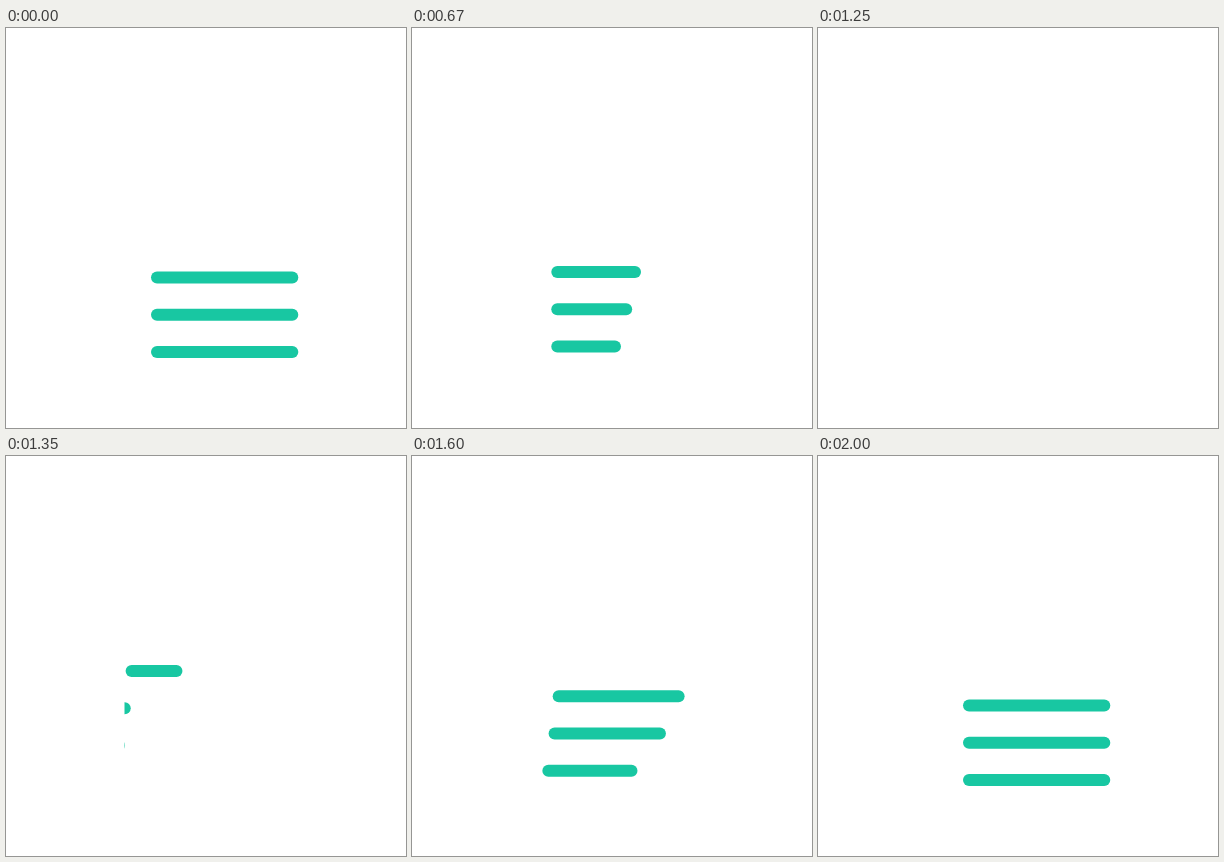
Recreate the animation shown at these times as an HTML page with a canvas. Size 400 by 400 pixels, loop 2.02 s.

```html
<!DOCTYPE html>
<html lang="en">
<head>
<meta charset="utf-8">
<title>Menu lines</title>
<style>
  html, body { margin: 0; width: 100%; height: 100%; overflow: hidden; background: #fff; }
  canvas { display: block; width: 400px; height: 400px; }
</style>
</head>
<body>
<canvas width="400" height="400"></canvas>
<script>
const ctx = document.querySelector('canvas').getContext('2d');
const LOOP = 2020, LEFT = 113, SHIFT = 38, LENGTH = 135.3, RISE = 37.3;
const bars = [
  { y: 249.5, start: 1167, time: 714 },
  { y: 286.8, start: 1291, time: 632 },
  { y: 324, start: 1347, time: 668 }
];

const clamp = v => Math.max(0, Math.min(1, v));

// cubic-bezier(.33, 0, .2, 1), solved by bisection
function ease(x) {
  if (x <= 0) return 0;
  if (x >= 1) return 1;
  let lo = 0, hi = 1;
  for (let i = 0; i < 24; i++) {
    const u = (lo + hi) / 2, v = 1 - u;
    if (3 * v * v * u * .33 + 3 * v * u * u * .2 + u ** 3 < x) lo = u;
    else hi = u;
  }
  return lo * lo * (3 - 2 * lo);
}

function line(x, y, length) {
  ctx.beginPath();
  ctx.moveTo(x, y);
  ctx.lineTo(x + Math.max(length, .01), y);
  ctx.stroke();
}

function leave(t) {
  const e = ease((t - 535) / 750);
  bars.forEach((bar, i) => {
    const left = 1 - clamp((t - 520) / (248 - 20 * i)) ** 1.7;
    if (left > 0) line(LEFT + SHIFT * (1 - e), bar.y - RISE * e, LENGTH * left);
  });
}

function enter(t) {
  const lift = RISE * (1 - ease((t - 1250) / 750));
  const edge = 130 - 11.5 * ((t - 1250) / 100) ** 2;
  ctx.save();
  ctx.beginPath();
  ctx.rect(Math.max(0, edge), 0, 400, 400);
  ctx.clip();
  for (const bar of bars) {
    const q = ease((t - bar.start) / bar.time);
    line(LEFT + SHIFT * q, bar.y - lift, LENGTH * q);
  }
  ctx.restore();
}

function draw(now) {
  const t = now % LOOP;
  ctx.clearRect(0, 0, 400, 400);
  ctx.strokeStyle = '#18c7a2';
  ctx.lineWidth = 12;
  ctx.lineCap = 'round';
  if (t < 770) leave(t);
  else if (t >= 1250) enter(t);
}

let begin;
function tick(now) {
  begin ??= now;
  draw(now - begin);
  requestAnimationFrame(tick);
}
draw(0);
requestAnimationFrame(tick);
</script>
</body>
</html>
```
